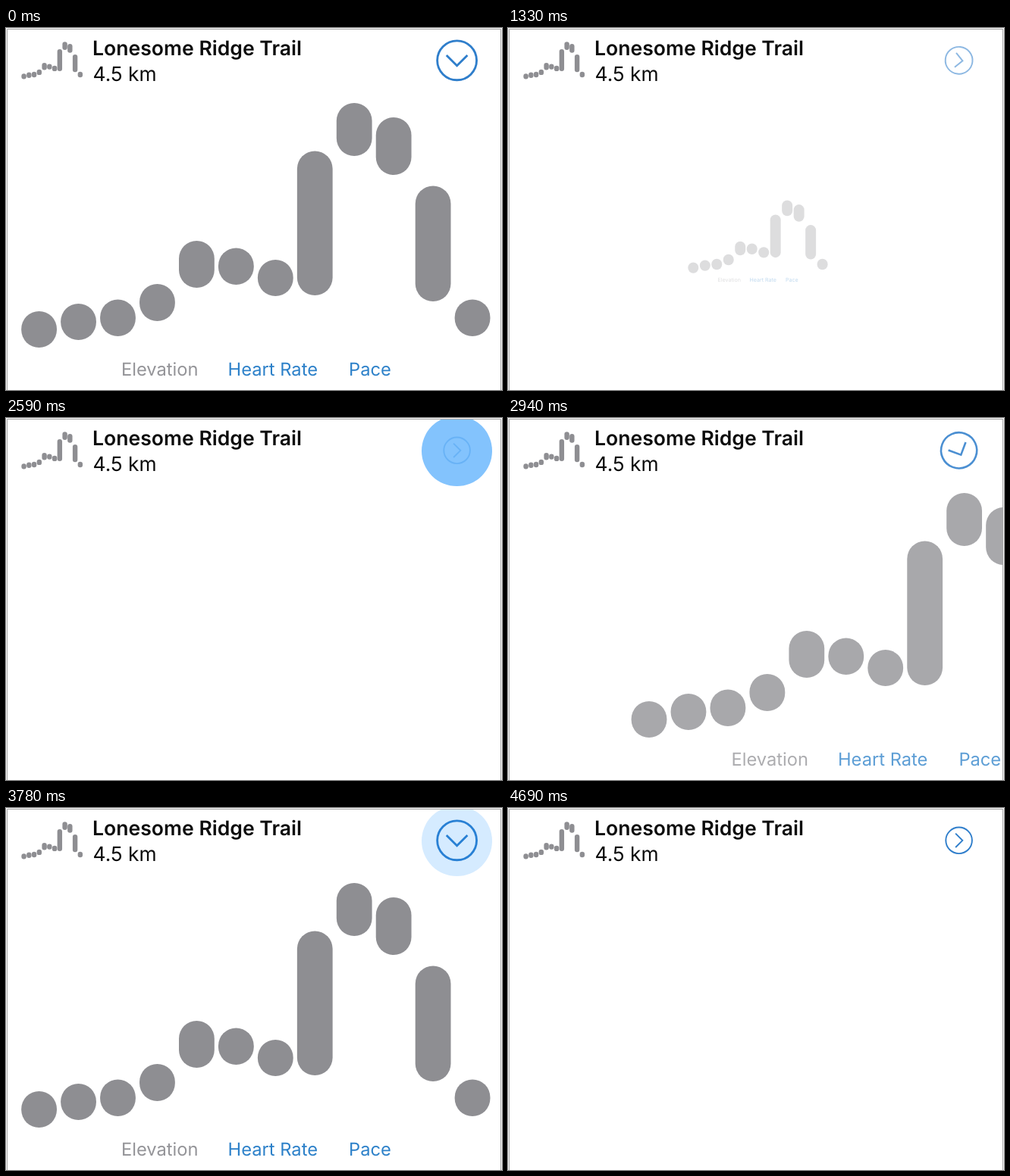
An HTML page that plays this animation: 654 px wide and 478 px high, repeating every 4.76 s.

```html
<!DOCTYPE html>
<html lang="en">
<head>
<meta charset="utf-8">
<title>Hike detail</title>
<style>
  html, body { margin: 0; width: 100%; height: 100%; overflow: hidden; background: #fff; }
  svg { display: block; width: 654px; height: 478px; }
  text { font: 26.4px Inter, "Open Sans", sans-serif; fill: #0c0c0c; text-rendering: geometricPrecision; }
  .title { font-weight: 600; font-size: 26.6px; }
  .tab { font-size: 23.7px; fill: #2d81c9; }
  .selected { fill: #949498; }
  .bars { fill: #8e8e92; }
  #button { fill: none; stroke: #2f7ecb; stroke-width: 1.9; }
</style>
</head>
<body>
<svg viewBox="0 0 654 478">
  <clipPath id="card"><rect x="2" y="2" width="650" height="476"/></clipPath>
  <path d="M1.5 478V1.5H652.5V478" fill="none" stroke="#a3a3a3"/>
  <g id="thumb" class="bars"></g>
  <text class="title" x="114" y="35.8">Lonesome Ridge Trail</text>
  <text x="114.5" y="70.3">4.5 km</text>
  <g clip-path="url(#card)">
    <g id="detail">
      <g id="chart" class="bars"></g>
      <text class="tab selected" x="152" y="459.3">Elevation</text>
      <text class="tab" x="292.6" y="459.3">Heart Rate</text>
      <text class="tab" x="452" y="459.3">Pace</text>
    </g>
    <g id="button">
      <circle r="17.3"/>
      <path d="M-4.5-9.2L4.7 0L-4.5 9.2"/>
    </g>
    <circle id="touch" cx="594.5" cy="43.5" r="46.5" fill="#0888fb"/>
  </g>
</svg>
<script>
const LOOP = 4760, STEP = 70;
const CENTER = { x: 329.5, y: 282 };
const ranges = [
  [374, 422], [364, 412], [358.5, 407], [338, 387], [281, 343], [290.5, 339],
  [306, 354], [162.5, 353], [99, 169], [118, 194], [208.5, 361], [358.5, 407]
];
const touches = [
  { down: 525, up: 1113, undim: 1190 },
  { down: 2030, up: 2697, undim: 2715 },
  { down: 3710, up: 4298, undim: 4375 }
];
const $ = id => document.getElementById(id);
const detail = $('detail'), button = $('button'), touch = $('touch');

function addBars(group, x, step, width, mapY) {
  ranges.forEach(([top, bottom], i) => {
    const bar = document.createElementNS('http://www.w3.org/2000/svg', 'rect');
    const attrs = { x: x + i * step, y: mapY(top), width, height: mapY(bottom) - mapY(top), rx: width / 2 };
    for (const key in attrs) bar.setAttribute(key, attrs[key]);
    group.append(bar);
  });
}
addBars($('chart'), 20.2, 51.95, 46.8, y => y);
addBars($('thumb'), 20.4, 6.75, 6.4, y => 18.2 + (y - 99) * 0.1525);

const ramp = (t, start, length) => Math.min(1, Math.max(0, (t - start) / length));
const ease = u => u ** 1.75 / (u ** 1.75 + (1 - u) ** 1.75);
const easedRamp = (t, start, length) => ease(ramp(t, start, length));

// 1 = expanded, 0 = collapsed; the button leads the chart when collapsing
function openness(t, lead, expandTime) {
  const [first, second, third] = touches.map(touch => touch.up);
  return 1 - easedRamp(t, first - lead, 350) + easedRamp(t, second, expandTime)
    - easedRamp(t, third - lead, 350);
}

function render(t) {
  const open = openness(t, 0, 365), turn = openness(t, 68, 382);
  const entering = t >= touches[1].up && t < touches[2].up;
  detail.setAttribute('opacity', open);
  detail.setAttribute('transform', entering
    ? `translate(${(1 - open) * 618} 0)`
    : `translate(${CENTER.x} ${CENTER.y}) scale(${open}) translate(${-CENTER.x} ${-CENTER.y})`);

  let press = 0, dim = 0;
  for (const { down, up, undim } of touches) {
    press += ramp(t, down, 210) - ramp(t, up, 150);
    dim += ramp(t, down + 70, 140) - easedRamp(t, undim, 320);
  }
  touch.setAttribute('opacity', press * 0.5);
  button.setAttribute('opacity', 1 - dim * 0.75);
  button.setAttribute('transform', `translate(594.6 42.8) rotate(${turn * 90}) scale(${1 + turn / 2})`);
}

function tick() {
  const t = performance.now() % LOOP;
  render(Math.floor(t / STEP) * STEP);
  requestAnimationFrame(tick);
}
tick();
</script>
</body>
</html>
```
